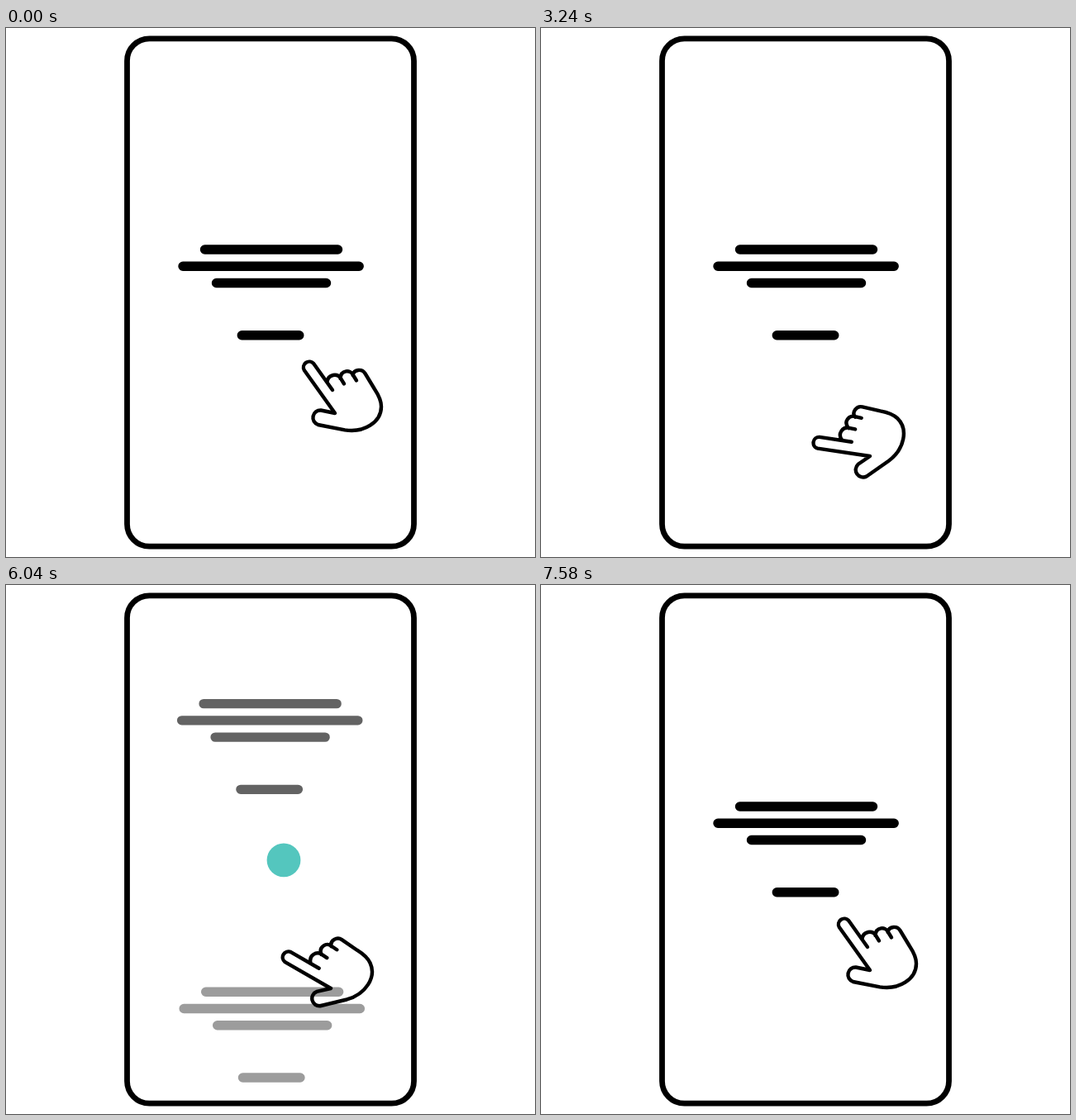
Recreate the animation shown at these times as an HTML page. Size 640 by 640 pixels, loop 7.72 s.

```html
<!DOCTYPE html>
<html lang="en">
<head>
<meta charset="utf-8">
<title>Swipe up</title>
<style>
  html, body { margin: 0; width: 100%; height: 100%; overflow: hidden; background: #fff; }
  svg { display: block; width: 100%; height: 100%; }
  .stroke { fill: none; stroke: #000; stroke-linecap: round; stroke-linejoin: round; }
</style>
</head>
<body>
<svg viewBox="0 0 640 640">
  <defs>
    <path id="lines" class="stroke" stroke-width="11.4"
      d="M240.5 0H401.5 M214 20.2H427.2 M254.5 40.5H387.5 M285.3 103.7H354.8"/>
  </defs>
  <use id="leaving" href="#lines"/>
  <use id="entering" href="#lines"/>
  <rect class="stroke" x="146.5" y="12.8" width="347" height="614.4" rx="27" stroke-width="6.8"/>
  <circle id="touch" r="0" fill="#54c6be"/>
  <g id="hand">
    <!-- drawn around the corner between thumb and index finger -->
    <path class="stroke" stroke-width="4.4" transform="translate(-398 -466)"
      d="M395 438L372.2 406A7 7 0 0 0 360.8 414L398 466L381 462.5A9 9 0 0 0 377.5 480
         L410 486.3C433 490 454 477 454 458C454 450 450 443 446 437L434.5 418
         C431 412 421 412.5 419.5 420
         M388.5 428C390 418.5 401 417.5 405 424L409 430.5
         M404.5 424C405 413.5 417 413 420 420L424 426.5"/>
  </g>
</svg>
<script>
  const LOOP = 7720, RESET = 7580, SWIPE = 5045, CYCLE = 1120;
  const TICKS = [0, 120, 240, 340, 440, 560, 680, 820, 860, 1000];

  // time, angle, x, y
  const POSES = [
    [0, 0, 398, 466],
    [1120, -21, 393.3, 489.6],
    [2120, -36.3, 393.5, 507],
    [3240, -46, 398, 518],
    [4480, -49.2, 399, 516.5],
    [5160, -48, 397, 511],
    [6040, -24.5, 393, 488],
    [6600, -12, 395, 475],
    [7580, 0, 398, 466]
  ];

  const $ = id => document.getElementById(id);
  const clamp = (v, lo = 0, hi = 1) => Math.min(hi, Math.max(lo, v));
  const place = (el, x, y, more = '') =>
    el.setAttribute('transform', `translate(${x} ${y}) ${more}`);

  function slope(i, k) {
    const a = POSES[Math.max(0, i - 1)], b = POSES[Math.min(POSES.length - 1, i + 1)];
    return (b[k] - a[k]) / (b[0] - a[0]);
  }

  // cubic Hermite curve through the poses
  function pose(t, k) {
    let i = 0;
    while (i < POSES.length - 2 && t >= POSES[i + 1][0]) i++;
    const a = POSES[i], b = POSES[i + 1], span = b[0] - a[0], u = (t - a[0]) / span;
    const w = u * u * (3 - 2 * u);
    return a[k] * (1 - w) + b[k] * w
      + span * u * (1 - u) * ((1 - u) * slope(i, k) - u * slope(i + 1, k));
  }

  function held(t) {
    const base = Math.floor(t / CYCLE) * CYCLE;
    return base + TICKS.filter(v => v <= t - base).pop();
  }

  function draw(time) {
    let t = held(time % LOOP);
    if (t >= RESET) t = 0;

    const since = Math.max(0, t - SWIPE);
    const fade = clamp(since * 0.00039);
    place($('leaving'), -0.0014 * since, 268 - 0.125 * since);
    $('leaving').setAttribute('opacity', 1 - fade);
    place($('entering'), 1.9 * (1 - fade), 635 - 0.1434 * since);
    $('entering').setAttribute('opacity', fade);

    const size = clamp((t - 4130) / 470) * clamp((7250 - t) / 450);
    place($('touch'), 336, Math.min(511, 501 - 0.191 * (t - 5160)));
    $('touch').setAttribute('r', 20.4 * size);

    place($('hand'), pose(t, 2), pose(t, 3), `rotate(${pose(t, 1)})`);
  }

  const start = performance.now();
  function frame() {
    draw(performance.now() - start);
    requestAnimationFrame(frame);
  }
  frame();
</script>
</body>
</html>
```
